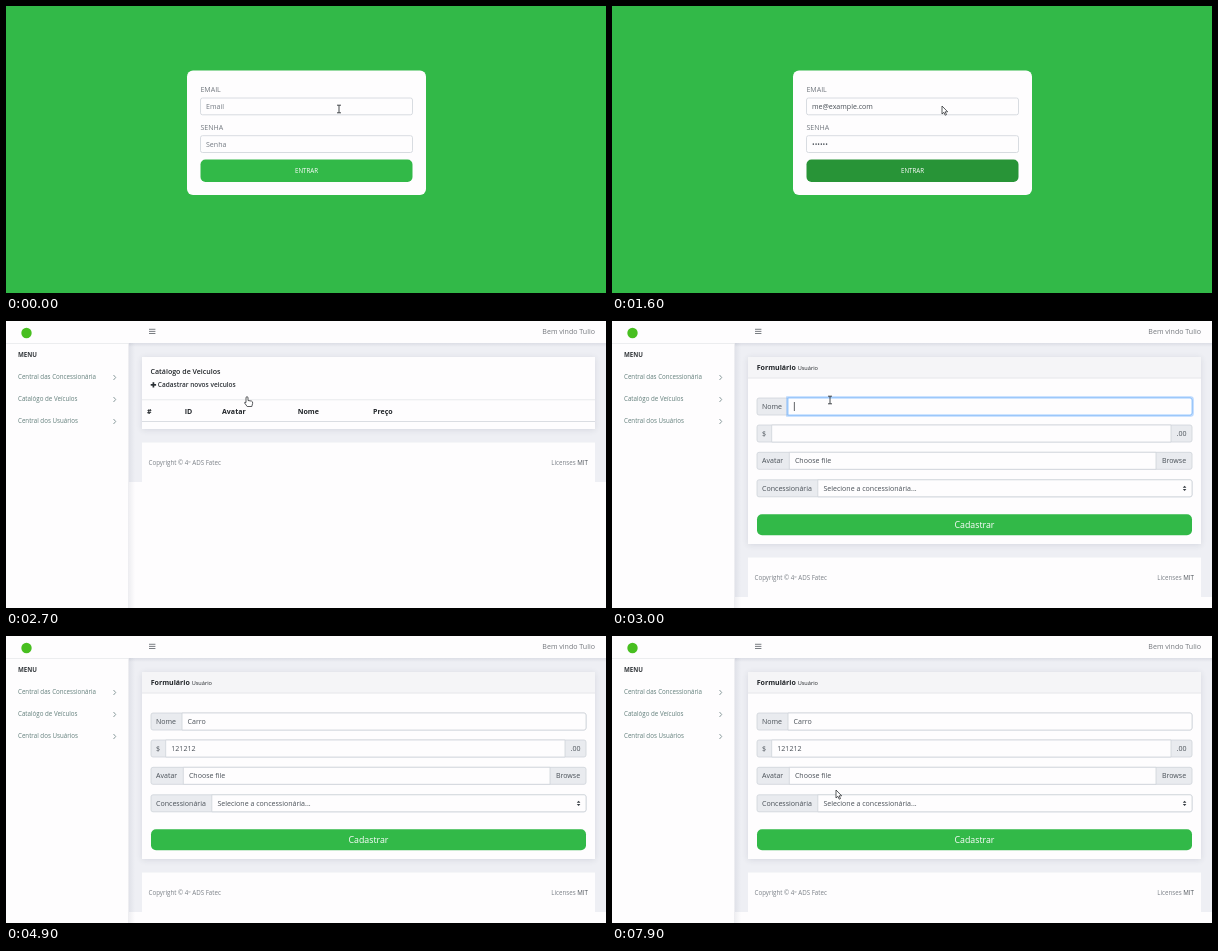
Recreate the animation shown at these times as an HTML page with a canvas. Size 600 px wide and 287 px high, loop 8000 ms.

```html
<!DOCTYPE html>
<html lang="pt">
<head>
<meta charset="utf-8">
<title>Central das Concessionárias</title>
<style>
html, body { margin: 0; width: 100%; height: 100%; overflow: hidden; background: #fefdfe; }
canvas { display: block; width: 600px; height: 287px; }
</style>
</head>
<body>
<canvas id="stage" width="600" height="287"></canvas>
<script>
const ctx = document.getElementById('stage').getContext('2d');
const LOOP = 8000, STEP = 100;
const GREEN = '#32b948', DARK_GREEN = '#289437', RED = '#d2214a';
const WHITE = '#fefdfe', PAGE = '#eeeff4', ADDON = '#e9ebef', LINE = '#ced3da';
const INK = '#212529', INPUT_INK = '#495057', GREY = '#7b8087';
const BASE = 7.05, SMALL = 6.2;

// y is the middle of the capitals
function text(str, x, y, { size = BASE, weight = 400, color = INK, align = 'left' } = {}) {
  ctx.font = `${weight} ${size}px "Open Sans", sans-serif`;
  ctx.fillStyle = color;
  ctx.textAlign = align;
  ctx.fillText(str, x, y + size * 0.36);
  return ctx.measureText(str).width;
}

function rect(x, y, w, h, color) {
  ctx.fillStyle = color;
  ctx.fillRect(x, y, w, h);
}

function round(x, y, w, h, r, fill, stroke, lineWidth = 0.8) {
  ctx.beginPath();
  ctx.roundRect(x, y, w, h, r);
  if (fill) { ctx.fillStyle = fill; ctx.fill(); }
  if (stroke) { ctx.strokeStyle = stroke; ctx.lineWidth = lineWidth; ctx.stroke(); }
}

function path(points, color, width = 1) {
  ctx.beginPath();
  points.forEach(([x, y], i) => i ? ctx.lineTo(x, y) : ctx.moveTo(x, y));
  ctx.strokeStyle = color;
  ctx.lineWidth = width;
  ctx.stroke();
}

function card(x, y, w, h, r = 0) {
  ctx.save();
  ctx.shadowColor = 'rgba(40,50,80,.13)';
  ctx.shadowBlur = 6;
  ctx.shadowOffsetY = 1;
  round(x, y, w, h, r, WHITE);
  ctx.restore();
}

function input(x, y, w, h, r, focused) {
  if (focused) round(x - 0.6, y - 0.6, w + 1.2, h + 1.2, r, null, 'rgba(60,150,255,.35)', 2.4);
  round(x, y, w, h, r, WHITE, focused ? '#80bdff' : LINE);
}

function field(value, hint, y, focused) {
  input(194.5, y, 212, 16.8, 2, focused);
  const w = text(value || hint, 200, y + 8.4, { color: value ? INPUT_INK : '#737a82' });
  if (focused) rect(value ? 200.3 + w : 200, y + 4, 0.7, 9, INK);
}

function login(s) {
  rect(0, 0, 600, 287, GREEN);
  round(181, 64.5, 239, 124.5, 6, WHITE);
  const label = { color: '#747a80' };
  text('EMAIL', 194.4, 83, label);
  text('SENHA', 194.4, 121, label);
  const chars = s < 2 ? 0 : Math.round((s - 1) * 3.5);
  const dots = s < 6 ? 0 : Math.min(6, (s - 5) * 2);
  field('me@example.com'.slice(0, chars), 'Email', 92, s > 0 && s < 6);
  field('•'.repeat(dots), 'Senha', 129.7, s >= 6 && s < 9);
  round(194.5, 153.5, 212, 22.5, 5, s < 9 ? GREEN : DARK_GREEN);
  text('ENTRAR', 300.5, 165, { size: SMALL, color: WHITE, align: 'center' });
}

function frame(footerY) {
  rect(0, 0, 600, 287, WHITE);
  rect(123, 22, 477, footerY + 39.5 - 22, PAGE);

  const side = ctx.createLinearGradient(122, 0, 129, 0);
  side.addColorStop(0, 'rgba(60,70,100,.09)');
  side.addColorStop(1, 'rgba(60,70,100,0)');
  rect(122, 22, 7, 265, side);
  const top = ctx.createLinearGradient(0, 22, 0, 26);
  top.addColorStop(0, 'rgba(60,70,100,.10)');
  top.addColorStop(1, 'rgba(60,70,100,0)');
  rect(123, 22, 477, 4, top);
  rect(0, 22, 123, 0.7, '#e6e7ea');

  ctx.beginPath();
  ctx.arc(20.5, 12, 5.2, 0, Math.PI * 2);
  ctx.fillStyle = '#48bf20';
  ctx.fill();
  for (let i = 0; i < 3; i++) rect(143, 7.8 + i * 2.1, 6.4, 0.9, '#6b7075');
  text('Bem vindo Tulio', 589, 10.5, { color: '#74787d', align: 'right' });

  text('MENU', 12, 33.5, { size: SMALL, weight: 700, color: '#35393d' });
  ['Central das Concessionária', 'Catalógo de Veículos', 'Central dos Usuários'].forEach((item, i) => {
    const y = 56 + i * 22;
    text(item, 12, y, { size: SMALL, color: '#627f7b' });
    path([[107.5, y - 2], [109.7, y + 0.5], [107.5, y + 3]], '#6d8385', 0.8);
  });

  rect(136, footerY, 453, 39.5, WHITE);
  const note = { size: SMALL, color: GREY };
  text('Copyright © 4º ADS Fatec', 142.5, footerY + 20, note);
  const w = text('MIT', 582, footerY + 20, { ...note, color: '#50565c', align: 'right' });
  text('Licenses ', 582 - w, footerY + 20, { ...note, align: 'right' });
}

function listHead(title, link, color) {
  text(title, 144.5, 50.8, { weight: 600 });
  rect(144.7, 63, 5.4, 1.7, color);
  rect(146.55, 61.2, 1.7, 5.3, color);
  text(link, 151.8, 64, { size: 6.5, weight: 600, color });
}

function headers(cols) {
  cols.forEach(([name, x]) => text(name, x, 90, { weight: 700 }));
}

function dealers() {
  frame(204);
  card(136, 36, 453, 155);
  listHead('Central das Concessionária', 'Registrar Concessionária', '#74797f');
  rect(136, 79, 453, 22, '#e4e6eb');
  headers([['#', 141], ['ID', 163.5], ['Concessionária', 186]]);
  [['12', 'Lume'], ['2', 'Olive Cab K2'], ['1', 'Olive Cab K1']].forEach(([id, name], i) => {
    const y = 112 + i * 27.7;
    if (i) rect(136, y - 11, 453, 0.6, '#e6e8ec');
    text(String(i + 1), 141, y);
    text(id, 163.5, y);
    text(name, 186, y);
    [['Editar', 503, GREEN], ['Deletar', 550, RED]].forEach(([label, x, color]) => {
      round(x, y - 5.2, 34, 17, 2, color);
      text(label, x + 17, y + 3.4, { size: SMALL, weight: 600, color: WHITE, align: 'center' });
    });
  });
}

function catalog(hover) {
  frame(121.5);
  card(136, 36, 453, 72);
  listHead('Catálogo de Veiculos', 'Cadastrar novos veiculos', hover ? '#2b3035' : '#74797f');
  rect(136, 78.5, 453, 0.7, '#dfe2e6');
  rect(136, 100, 453, 1, '#dadde2');
  headers([['#', 141], ['ID', 178.7], ['Avatar', 216], ['Nome', 291.7], ['Preço', 367]]);
}

// left addon, editable area, optional right addon
function group(y, label, split, value, { right, end = 580, focus = false, color = INPUT_INK } = {}) {
  round(145, y, 435, 17, 2, ADDON, LINE);
  text(label, 150, y + 8.6, { color: INPUT_INK });
  input(split, y, end - split, 17, right ? 0 : [0, 2, 2, 0], focus);
  if (right) text(right, (end + 580) / 2, y + 8.6, { color: INPUT_INK, align: 'center' });
  const w = text(value, split + 5.6, y + 8.6, { color });
  if (focus) rect(split + 5.9 + w, y + 4, 0.7, 9, INK);
}

function form(s) {
  frame(236.5);
  card(136, 36, 453, 187);
  rect(136, 36, 453, 21, '#f5f5f7');
  rect(136, 56.7, 453, 0.7, '#dcdee2');
  const w = text('Formulário ', 144.7, 46.5, { weight: 700 });
  text('Usuário', 144.7 + w, 47, { size: 5.6 });

  const typed = (str, from) => str.slice(0, Math.max(0, s - from));
  group(77, 'Nome', 176, typed('Carro', 30), { focus: s >= 30 && s < 36 });
  group(104, '$', 159.7, typed('121212', 35), { right: '.00', end: 559, focus: s >= 36 && s < 42 });
  group(131.3, 'Avatar', 177.3, 'Choose file', { right: 'Browse', end: 544 });
  group(158.8, 'Concessionária', 205.8, 'Selecione a concessionária...');
  ctx.fillStyle = '#343a40';
  for (const d of [-1, 1]) {
    ctx.beginPath();
    ctx.moveTo(570.8, 167.3 + d * 0.6);
    ctx.lineTo(574.4, 167.3 + d * 0.6);
    ctx.lineTo(572.6, 167.3 + d * 2.6);
    ctx.fill();
  }
  round(145, 193.3, 435, 21, 5, GREEN);
  text('Cadastrar', 362.5, 204, { size: 8.8, color: WHITE, align: 'center' });
}

const shapes = {
  beam() {
    path([[-2, -3.8], [2, -3.8]], '#33373b', 0.9);
    path([[-2, 3.8], [2, 3.8]], '#33373b', 0.9);
    path([[0, -3.8], [0, 3.8]], '#33373b', 0.9);
  },
  arrow() {
    const p = new Path2D('M0 0V8L1.9 6.3L3.2 9.2L4.5 8.6L3.2 5.8H5.7Z');
    ctx.fillStyle = '#fff';
    ctx.strokeStyle = '#303337';
    ctx.lineWidth = 0.8;
    ctx.fill(p);
    ctx.stroke(p);
  },
  hand() {
    const p = new Path2D('M-1 .8Q0-.4 1 .8V4L4.6 4.6Q6 5 5.6 7L4.8 10H.2L-2.4 6.5Q-2.4 5-1 6Z');
    ctx.fillStyle = '#fff';
    ctx.strokeStyle = '#303337';
    ctx.lineWidth = 0.8;
    ctx.fill(p);
    ctx.stroke(p);
  }
};

// step, x, y, shape
const track = [
  [0, 333, 103, 'beam'], [10, 333, 103, 'arrow'], [12, 330, 100, 'arrow'],
  [17, 330, 100, 'beam'], [18, 330, 100, 'arrow'], [21, 46, 76, 'hand'],
  [24, 46, 76, 'arrow'], [27, 241, 75.5, 'hand'], [28, 212, 65, 'hand'],
  [29, 212, 65, 'arrow'], [30, 218, 79, 'beam'], [37, 218, 79, 'beam'],
  [38, 232, 98, 'arrow'], [42, 351, 197, 'hand'], [44, 351, 197, null],
  [64, 224, 154, 'arrow'], [80, 224, 154, 'arrow']
];

function cursor(s) {
  const i = track.findIndex(k => k[0] > s) - 1;
  const [t0, x0, y0, shape] = track[i], [t1, x1, y1] = track[i + 1];
  if (!shape) return;
  const u = (s - t0) / (t1 - t0), e = u * u * (3 - 2 * u);
  ctx.save();
  ctx.translate(x0 + (x1 - x0) * e, y0 + (y1 - y0) * e);
  shapes[shape]();
  ctx.restore();
}

function draw(ms) {
  const s = Math.floor((ms % LOOP) / STEP);
  if (s < 17) login(s);
  else if (s < 23) dealers();
  else if (s < 29) catalog(s >= 27);
  else form(s);
  cursor(s);
}

const start = performance.now();
function tick() {
  draw(performance.now() - start);
  requestAnimationFrame(tick);
}
tick();
</script>
</body>
</html>
```
